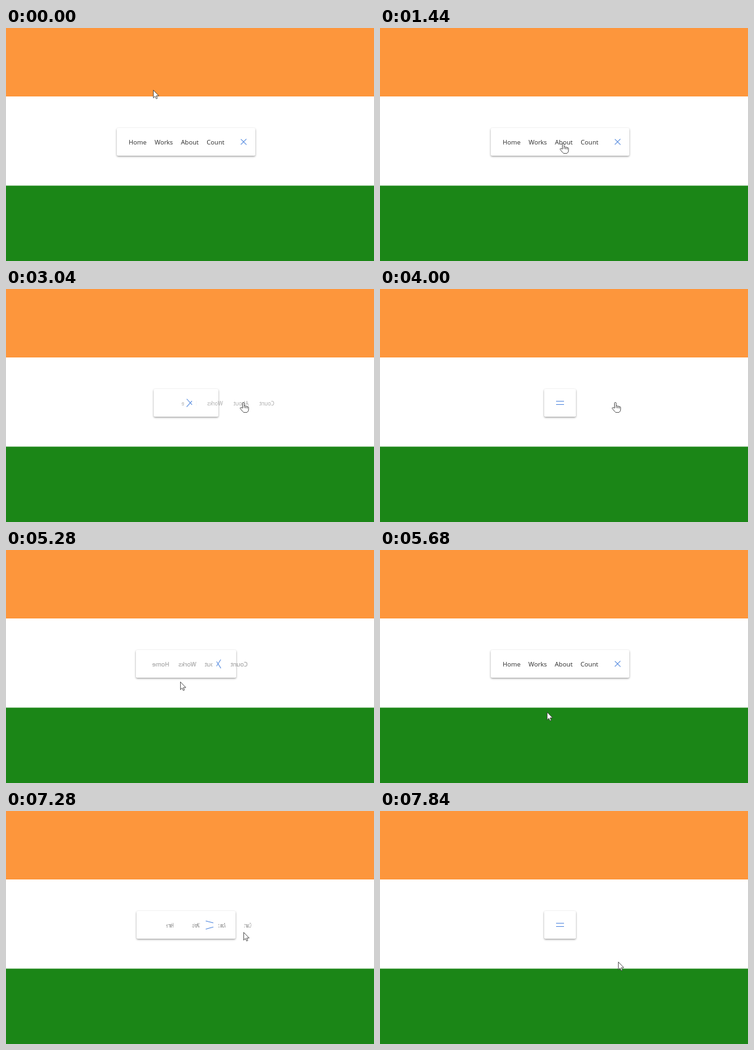
An HTML page that plays this animation: 558x354 px, repeating every 8 s.

```html
<!DOCTYPE html>
<html lang="en">
<head>
<meta charset="utf-8">
<title>Menu</title>
<style>
  * { box-sizing: border-box; }
  html, body { margin: 0; width: 100%; height: 100%; overflow: hidden; }
  body {
    background: linear-gradient(#fd963c 104px, #fff 104px 239px, #1b8617 240px);
    font: 9.6px "Open Sans", sans-serif;
  }
  main {
    display: flex; align-items: center; justify-content: center;
    width: 546px; height: 346px;
  }
  nav {
    display: flex; align-items: center; justify-content: center;
    width: calc(48px + 162px * var(--nav)); height: 42px; padding: 12px;
    background: #fff; border-radius: 1.8px;
    box-shadow: 0 1.2px 3px rgba(0, 0, 0, .4);
  }
  ul {
    display: flex; width: calc(100% * var(--list));
    margin: 0; padding: 0; list-style: none;
  }
  li {
    opacity: var(--turn);
    transform: rotateY(calc(360deg * var(--turn)));
  }
  a { position: relative; margin: 0 6px; color: #2a2a2a; }
  button {
    position: relative; width: 18px; height: 18px;
    padding: 0; border: 0; background: #fff;
  }
  i {
    --dir: -1;
    position: absolute; left: 2.6px; top: 6px;
    width: 12px; height: 1.2px; background: #5a8ee0;
    transform:
      rotate(calc(765deg * var(--dir) * var(--turn)))
      translateY(calc(-3.3px * var(--dir) * var(--turn)));
  }
  i + i { --dir: 1; top: auto; bottom: 6px; }
  svg {
    position: absolute; left: 0; top: 0; width: 1px; height: 1px;
    overflow: visible; pointer-events: none;
    fill: #fff; stroke: #333; stroke-width: .8; stroke-linejoin: round;
  }
  .over .arrow, svg:not(.over) .hand { display: none; }
</style>
</head>
<body>
<main>
  <nav>
    <ul>
      <li><a>Home</a></li>
      <li><a>Works</a></li>
      <li><a>About</a></li>
      <li><a>Count</a></li>
    </ul>
    <button aria-label="Menu"><i></i><i></i></button>
  </nav>
</main>
<svg id="cursor">
  <path class="arrow" d="M.4.4V12.2L3 9.7 4.8 13.5 6.6 12.7 4.9 9H8.7Z"/>
  <g class="hand">
    <path d="M-1.5 9V1.6a1.3 1.3 0 0 1 2.6 0V6c.3-.9 2.3-.8 2.4.5.3-.9 2.2-.8 2.3.6.4-.8 2-.6 2 .8V11C7.8 13.5 6.5 15.6 4 15.6H2C0 15.6-1 14.6-2 13L-4.8 9.6C-5.3 8.3-4 7.5-3 8.3Z"/>
    <path d="M1.1 6v3M3.5 6.5v2.7M5.8 7.1v2.4" fill="none"/>
  </g>
</svg>
<script>
  const LOOP = 8000, STEP = 80;
  const DURATIONS = { nav: 600, list: 500, turn: 700 };
  const CLICKS = [2626, 4898, 7060];

  // Eased glides of the pointer, each from where the last one ended
  const HOME = { x: 223, y: 94 };
  const GLIDES = [
    { at: 0, ms: 880, x: 202, y: 177 },
    { at: 940, ms: 880, x: 328, y: 173 },
    { at: 1840, ms: 640, x: 361, y: 176 },
    { at: 2640, ms: 300, x: 360, y: 172 },
    { at: 3960, ms: 360, x: 270, y: 174 },
    { at: 4960, ms: 800, x: 253, y: 248 },
    { at: 5960, ms: 540, x: 360, y: 176 },
    { at: 7100, ms: 740, x: 361, y: 229 }
  ];

  const nav = document.querySelector('nav');
  const cursor = document.getElementById('cursor');

  const clamp = k => Math.max(0, Math.min(1, k));
  const ease = k => k * k * (3 - 2 * k);

  function pointerAt(t) {
    let { x, y } = HOME;
    for (const g of GLIDES) {
      const k = ease(clamp((t - g.at) / g.ms));
      x += (g.x - x) * k;
      y += (g.y - y) * k;
    }
    return [Math.round(x), Math.round(y)];
  }

  // The menu starts open and every click flips it
  function drawMenu(t) {
    const past = CLICKS.filter(c => c <= t);
    const open = past.length % 2 === 0;
    const since = past.length ? t - past.pop() : Infinity;
    for (const [name, ms] of Object.entries(DURATIONS)) {
      const k = clamp(since / ms);
      nav.style.setProperty('--' + name, open ? k : 1 - k);
    }
  }

  function drawCursor(t) {
    const [x, y] = pointerAt(t);
    cursor.style.left = x + 'px';
    cursor.style.top = y + 'px';
    const hit = document.elementFromPoint(x, y);
    cursor.classList.toggle('over', !!hit && !!hit.closest('a, button'));
  }

  function tick() {
    const now = performance.now() % LOOP;
    const t = Math.floor(now / STEP) * STEP;
    drawMenu(t);
    drawCursor(t);
    requestAnimationFrame(tick);
  }
  tick();
</script>
</body>
</html>
```
